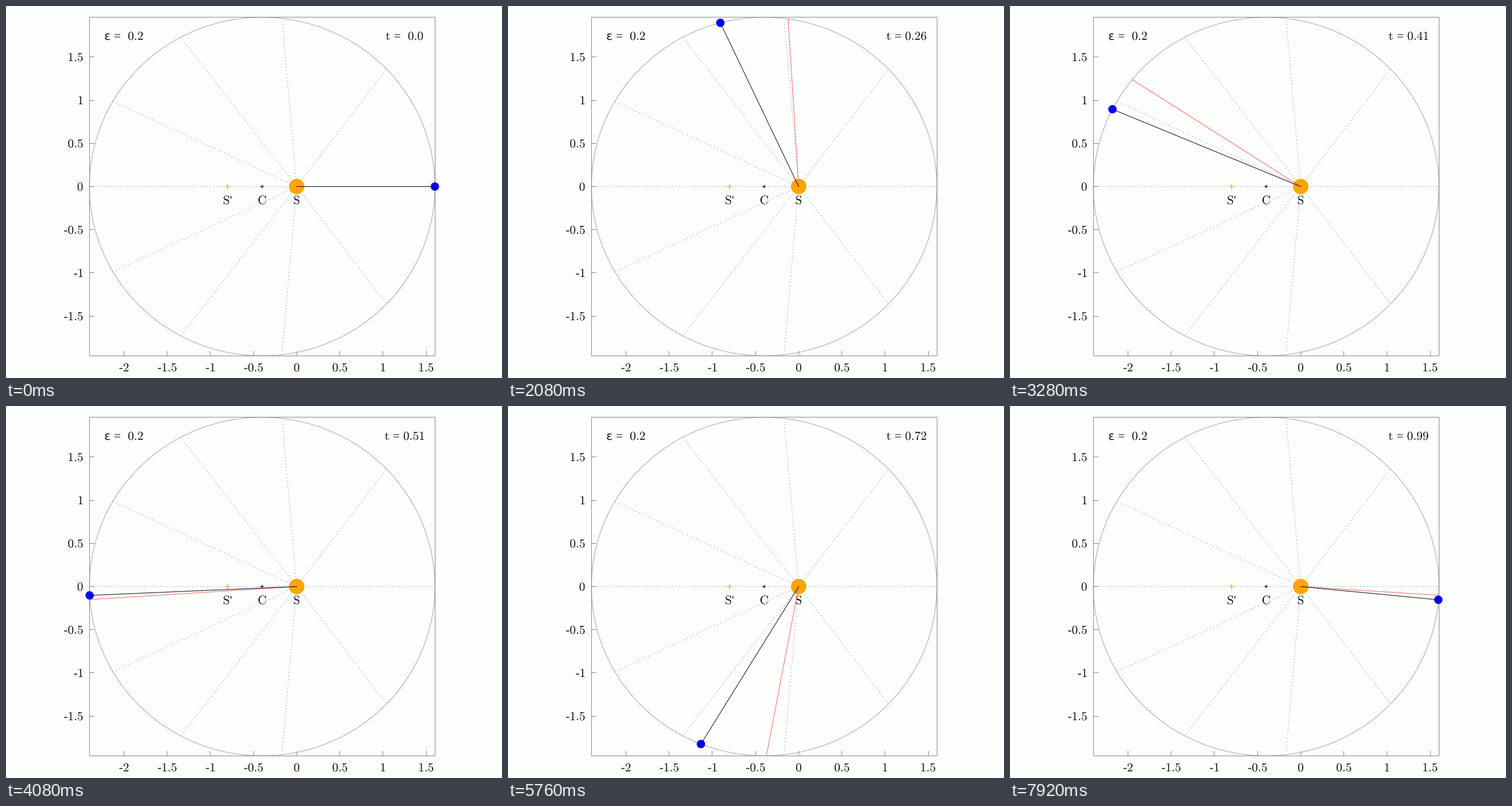
These frames come from a looping animation (864 px wide and 648 px high, 8 s). A matplotlib script:

```python
import numpy as np
import matplotlib.pyplot as plt
from matplotlib.animation import FuncAnimation
from matplotlib.patches import Circle, Ellipse, PathPatch, Rectangle
from matplotlib.path import Path
from matplotlib.textpath import TextPath
from matplotlib.transforms import Affine2D

plt.rcParams["mathtext.fontset"] = "cm"
plt.rcParams["path.snap"] = False

W, H, DPI = 864, 648, 100
FRAMES, INTERVAL = 100, 80
ECC, A = 0.2, 2.0
B = A * np.sqrt(1 - ECC**2)
UNIT = 150.45                     # pixels per axis unit
SX, SY = 506.35, H - 314.5        # the sun, y upwards
LEFT, RIGHT = 145.5, 747.5
BOTTOM, TOP = H - 609.5, H - 19.5
EM = 21.3
SPACE = 0.285 * EM
PX = 72 / DPI
GREY = "#868686"

fig = plt.figure(figsize=(W / DPI, H / DPI), dpi=DPI, facecolor="#fdfffd")
ax = fig.add_axes([0, 0, 1, 1])
ax.set(xlim=(0, W), ylim=(0, H))
ax.axis("off")


def to_px(x, y):
    return SX + UNIT * x, SY + UNIT * y


def true_anomaly(t):
    """Solve Kepler's equation for time t, in periods."""
    mean = 2 * np.pi * t
    ecc_anom = mean
    for _ in range(12):
        ecc_anom -= (ecc_anom - ECC * np.sin(ecc_anom) - mean) / (1 - ECC * np.cos(ecc_anom))
    return 2 * np.arctan2(np.sqrt(1 + ECC) * np.sin(ecc_anom / 2),
                          np.sqrt(1 - ECC) * np.cos(ecc_anom / 2))


def orbit_point(angle):
    r = A * (1 - ECC**2) / (1 + ECC * np.cos(angle))
    return to_px(r * np.cos(angle), r * np.sin(angle))


def line(xs, ys, color, width, **kw):
    return ax.plot(xs, ys, color=color, lw=width * PX, **kw)[0]


def shifted(path, x, y=0):
    return path.transformed(Affine2D().translate(x, y))


def roman(s):
    return TextPath((0, 0), rf"$\mathrm{{{s}}}$", size=EM)


def plain(s, x=0, family="Liberation Serif", size=EM):
    return TextPath((x, 0), s, size=size, prop={"family": family})


def number(s):
    digits = roman(s.lstrip("-"))
    if s.startswith("-"):
        return Path.make_compound_path(plain("-", -0.333 * EM), digits)
    return digits


def equals(value, spaces):
    """An equals sign and a value, with the given number of spaces between."""
    gap = 0.564 * EM + spaces * SPACE
    return Path.make_compound_path(plain("="), shifted(roman(value), gap))


def placed(path, x, y, align=0.5):
    """Move a text path so the given fraction of its width is at x, baseline y from the top."""
    box = path.get_extents()
    anchor = box.x0 + align * box.width
    return shifted(path, x - anchor, H - y)


def write(path, x, y, align=0.5):
    patch = PathPatch(placed(path, x, y, align), fc="#111111", lw=0, zorder=5)
    return ax.add_patch(patch)


def clock(k):
    value = str(k / FRAMES)
    rest = shifted(equals(value, 5 - len(value)), 0.389 * EM + SPACE)
    return placed(Path.make_compound_path(roman("t"), rest), 694, 59)


def plus(x, y, arm, color, width):
    line([x - arm, x + arm], [y, y], color, width, zorder=4)
    line([x, x], [y - arm, y + arm], color, width, zorder=4)


# Orbit, frame and equal-time rays
cx, cy = to_px(-ECC * A, 0)
ax.add_patch(Ellipse((cx, cy), 2 * A * UNIT, 2 * B * UNIT, fill=False,
                     ec="#bebebe", lw=1.5 * PX, zorder=1))
ax.add_patch(Rectangle((LEFT, BOTTOM), RIGHT - LEFT, TOP - BOTTOM, fill=False,
                       ec=GREY, lw=PX, zorder=1.5))
for k in range(10):
    ex, ey = orbit_point(true_anomaly(k / 10))
    line([SX, ex], [SY, ey], "#7c7cff", 1.2, zorder=2,
         ls=(0, (1, 3.8)), dash_capstyle="butt")

# Ticks, centred on whole pixels, and their labels
for v in np.arange(-2, 2, 0.5):
    x, y = to_px(v, v)
    tx, ty = np.floor([x, y]) + 0.5
    name = f"{v:g}"
    line([tx, tx], [BOTTOM, BOTTOM + 8], GREY, 1)
    write(number(name), x, 636.5)
    if v > -2:
        line([LEFT, LEFT + 8], [ty, ty], GREY, 1)
        write(number(name), 133.6, H - y + 7.2, 1)

# Sun, centre and empty focus
ax.add_patch(Circle((SX, SY), 13.5, fc="#ffa500", lw=0, zorder=4))
plus(cx, cy, 2.3, "black", 1.2)
fx = to_px(-2 * ECC * A, 0)[0]
plus(fx, SY, 4.5, "#ffa500", 1.3)
write(roman("S"), SX, 345.2)
write(roman("C"), cx, 345.2)
write(Path.make_compound_path(roman("S"), plain("'", 0.556 * EM)), fx, 345.2)

write(plain("ε", family="DejaVu Sans", size=20), 172.5, 59, 0)
write(equals("0.2", 2), 238.3, 59, 1)

# Moving parts
mean_ray = line([], [], "#ff6060", 1, zorder=6)
planet = ax.add_patch(Circle((SX, SY), 7.3, fc="#0000ff", lw=0, zorder=7))
planet_ray = line([], [], "#1a1a1a", 1.1, zorder=8)
time_text = ax.add_patch(PathPatch(clock(0), fc="#111111", lw=0, zorder=5))


def update(k):
    t = k / FRAMES
    mx, my = orbit_point(2 * np.pi * t)
    px, py = orbit_point(true_anomaly(t))
    mean_ray.set_data([SX, mx], [SY, my])
    planet_ray.set_data([SX, px], [SY, py])
    planet.center = px, py
    time_text.set_path(clock(k))
    return mean_ray, planet, planet_ray, time_text


anim = FuncAnimation(fig, update, frames=FRAMES, interval=INTERVAL,
                     repeat=True, repeat_delay=0, blit=False)
plt.show()
```
